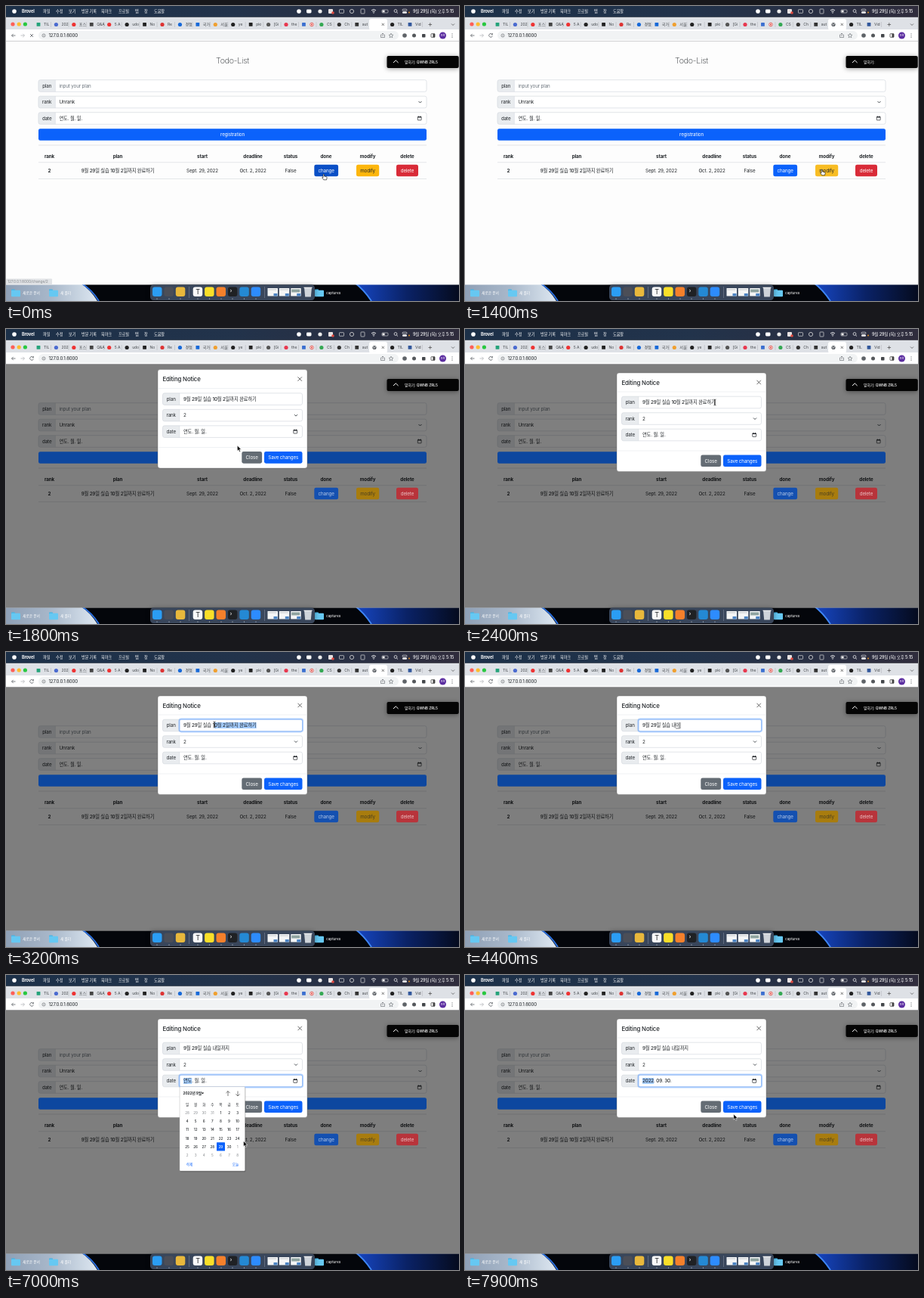
These frames come from a looping animation (600 px wide and 390 px high, 8 s). An HTML page:

```html
<!DOCTYPE html>
<html lang="ko">
<head>
<meta charset="utf-8">
<title>Todo-List</title>
<style>
html, body { margin: 0; width: 100%; height: 100%; overflow: hidden; background: #000; }
svg { display: block; width: 600px; height: 390px; }
text { font-family: Inter, 'Noto Sans CJK KR', 'Noto Sans CJK', sans-serif; letter-spacing: -.02em; white-space: pre; }
#dock, #call { filter: drop-shadow(0 1px 3px #0006); }
</style>
</head>
<body>
<svg id="stage" viewBox="0 0 600 390"></svg>
<script>
const INK = '#212529', BLUE = '#0b62fb', GREY = '#ced4da';
const PLAN = '9월 29일 실습 10월 2일까지 완료하기', KEPT = '9월 29일 실습 ';
const TYPED = ['', 'ㄴ', '내', '냉', '내이', '내일', '내일ㄲ', '내일까', '내일깢', '내일까지'];
const SPEAKER = '말하기: QWNB ZRL5';

// Shapes as markup; text is placed by its vertical middle
const rect = (x, y, w, h, fill, r = 0, more = '') =>
  `<rect x="${x}" y="${y}" width="${w}" height="${h}" fill="${fill}" rx="${r}" ${more}/>`;
const dot = (x, y, r, fill, more = '') => `<circle cx="${x}" cy="${y}" r="${r}" fill="${fill}" ${more}/>`;
const line = (d, color = INK, w = .8, more = '') =>
  `<path d="${d}" fill="none" stroke="${color}" stroke-width="${w}" ${more}/>`;
const text = (s, x, y, { size = 6.25, weight = /[가-힣]/.test(s) ? 500 : 400, fill = INK, mid = false, id = '' } = {}) =>
  `<text x="${x}" y="${y}" dy=".36em" fill="${fill}" font-size="${size}" font-weight="${weight}"` +
  `${mid ? ' text-anchor="middle"' : ''}${id ? ` id="${id}"` : ''}>${s}</text>`;
const button = (s, x, y, w, fill, ink = '#fff', id = s) =>
  rect(x, y, w, 15.6, fill, 2.4, `id="${id}"`) + text(s, x + w / 2, y + 7.8, { fill: ink, mid: true, id: id + 'Label' });
const group = (id, body) => `<g id="${id}">${body}</g>`;
const gradient = (id, ...colors) => `<linearGradient id="${id}">` +
  colors.map((c, i) => `<stop offset="${i / (colors.length - 1)}" stop-color="${c}"/>`).join('') + '</linearGradient>';

const calendarIcon = (x, y) => rect(x - 2.4, y - 2, 4.8, 4.4, 'none', .4, `stroke="${INK}" stroke-width=".7"`) +
  line(`M${x - 2.4} ${y - 1.5}h4.8M${x - 1.4} ${y - 3}v1M${x + 1.4} ${y - 3}v1`, INK, 1);
const chevron = (x, y) => line(`M${x - 2} ${y - 1}l2 2 2-2`, '#343a40', .9);

function field(x, y, w, label, value, kind, fill = INK, id = '') {
  const right = x + w, top = y - 7.8;
  return rect(x, top, w, 15.6, '#fff', 2.4) +
    `<path d="M${x + 22.3} ${top}H${x + 2.4}q-2.4 0-2.4 2.4v10.8q0 2.4 2.4 2.4H${x + 22.3}z" fill="#e9ecef"/>` +
    line(`M${x + 22.3} ${top}v15.6`, GREY, .5) +
    rect(x, top, w, 15.6, 'none', 2.4, `stroke="${GREY}" stroke-width=".6"`) +
    (id ? rect(0, y - 4, 0, 8, '#a3cbfb', 0, `id="${id}Mark"`) : '') +
    text(label, x + 11.2, y, { mid: true }) + text(value, x + 27.5, y, { fill, id, weight: id ? 500 : undefined }) +
    (kind === 'rank' ? chevron(right - 8.5, y) : kind === 'date' ? calendarIcon(right - 9.3, y) : '');
}

// Black sky between two curved, blue-rimmed bodies
const wallpaper = () => gradient('pale', '#8fa0b6', '#a9b8ca', '#dde7f1') + gradient('deep', '#1747c4', '#0a2266', '#050b1e') +
  rect(0, 366, 600, 24, '#04060b') +
  '<path d="M0 366H98Q112 375 121 390H0z" fill="url(#pale)"/>' + line('M99 366Q114 375 123 390', '#2a6fe0', 2) +
  '<path d="M462 366Q474 375 484 390H600V366z" fill="url(#deep)"/>' + line('M462 366Q474 375 484 390', '#3f86f5', 2);

function menuBar() {
  const white = { size: 5.2, fill: '#fff' };
  const items = [['파일', 49], ['수정', 66], ['보기', 83], ['방문 기록', 100], ['북마크', 126],
    ['프로필', 149], ['탭', 171], ['창', 183], ['도움말', 196]];
  return gradient('bar', '#1c3048', '#22334b', '#2f2c3c') + rect(0, 0, 600, 14.5, 'url(#bar)') + dot(11, 7, 2.8, '#fff') +
    text('Brovel', 21, 7, { size: 5.6, weight: 700, fill: '#fff' }) +
    items.map(([s, x]) => text(s, x, 7, white)).join('') +
    dot(388, 7, 2.8, '#fff') + rect(398, 4.5, 6.5, 5, '#fff', 1.4) +
    dot(416, 7, 2.6, '#eee') + rect(427, 4, 6, 6, '#e9e2e2', 1) + dot(433, 9, 1.8, '#e0483e') +
    rect(441.5, 4.7, 6, 4.6, 'none', .6, 'stroke="#ddd" stroke-width=".7"') +
    dot(458, 7, 2.6, 'none', 'stroke="#ddd" stroke-width=".8"') +
    rect(470, 4, 5, 6, 'none', .7, 'stroke="#ddd" stroke-width=".7"') +
    line('M484 5.8q3-2.6 6 0M485.4 7.5q1.6-1.5 3.2 0', '#fff', .9) + dot(487, 9, .7, '#fff') +
    rect(498, 5, 8, 4, 'none', 1, 'stroke="#ddd" stroke-width=".6"') + rect(498.6, 5.6, 3, 2.8, '#eee') +
    dot(516, 6.5, 1.9, 'none', 'stroke="#fff" stroke-width=".7"') + line('M517.4 8l1.6 1.6', '#fff') +
    rect(525, 4.2, 6, 2.2, 'none', 1.1, 'stroke="#fff" stroke-width=".6"') + rect(525, 7.6, 6, 2.2, '#fff', 1.1) +
    dot(534, 8.5, .9, '#f59a23') + text('9월 29일 (목) 오후 5:15', 539, 7, { ...white, size: 5.5 });
}

function browser() {
  const names = ['TIL', '202', '포스', 'Q&amp;A', '5 A', 'udo', 'No', 'Re', '경험', '국가', '서울', 'ye', 'pki',
    '[Gi', 'the', '', 'CS', 'Ch', 'aut', '', 'TIL', 'Vid'];
  const colors = ['#25a37a', '#4b6bd0', '#e33', '#444', '#e33', '#222', '#222', '#d33', '#1769d8', '#1769d8', '#f0a030',
    '#222', '#222', '#555', '#e8384f', '#3b6fd0', '#34a853', '#333', '#333', '', '#222', '#31579b'];
  let out = rect(0, 14.5, 600, 17, '#dee1e6') + rect(481, 17, 24, 14.5, '#fff', 2.5);
  ['#fe5f57', '#febc2e', '#28c840'].forEach((c, i) => out += dot(9 + i * 8.2, 24, 2.6, c));
  names.forEach((s, i) => {
    const x = 43 + i * 23.43;
    if (colors[i]) out += i % 3 ? dot(x, 24.5, 2.6, colors[i]) : rect(x - 2.4, 22, 4.8, 4.8, colors[i], .6);
    if (i < 18 || i > 20) out += line(`M${x + 16.5} 21v7`, '#a5a8ad', .4);
    out += text(s, x + 7, 24.5, { size: 5.1, fill: '#45494d' });
  });
  out += dot(405, 24.5, 2.3, '#fff', 'stroke="#e0403a" stroke-width=".8"') + dot(405, 24.5, 1.1, '#e0403a') +
    line('M497.7 22.8l3.2 3.2m0-3.2l-3.2 3.2M559.5 24.5h4.6m-2.3-2.3v4.6M590 23.5l2 2 2-2', '#444', .7) +
    group('globe', dot(488, 24.5, 2.6, '#5f6368') + line('M486 23.5l2 1 2-1.2M487 26l1-1', '#fff', .6));

  out += rect(0, 31, 600, 15.5, '#fff') + rect(43, 33, 477, 11.8, '#f1f3f4', 5.9) +
    line('M12.5 39h-5m2.2-2.2L7.5 39l2.2 2.2', '#5f6368') + line('M19.5 39h5m-2.2-2.2l2.2 2.2-2.2 2.2', '#b4b7ba') +
    group('reload', line('M36 37.3A2.4 2.4 0 1 0 36.4 39.6M36.4 36v1.9h-1.9', '#5f6368')) +
    group('stop', line('M32 37l4 4m0-4l-4 4', '#5f6368')) +
    dot(50, 39, 2.1, 'none', 'stroke="#5f6368" stroke-width=".6"') + line('M50 38.6v1.5M50 37.7v.4', '#5f6368', .6) +
    text('127.0.0.1:8000', 56.5, 39, { size: 6.1 }) +
    line('M497.5 38h-1v3.5h5v-3.5h-1M499 40v-4m-1.3 1.3L499 36l1.3 1.3', '#5f6368', .6) +
    line('M510 36.2l.9 1.9 2 .2-1.5 1.4.4 2-1.8-1-1.8 1 .4-2-1.5-1.4 2-.2z', '#5f6368', .6) +
    dot(528, 39, 2.8, '#5f6368') + dot(540.5, 39, 2.5, '#55585c') + rect(551, 37, 4.5, 4.5, '#44474b', .8) +
    rect(563, 36.7, 5, 4.6, 'none', .5, 'stroke="#444" stroke-width=".8"') + rect(565.5, 36.7, 2.5, 4.6, '#444') +
    dot(578.5, 39, 4.5, '#5b2da0') + text('초록', 578.5, 39, { size: 3.4, fill: '#fff', mid: true });
  [36.8, 39, 41.2].forEach(y => out += dot(591, y, .6, '#5f6368'));
  return out + line('M0 46.3h600', '#dfe1e4', .5);
}

function page() {
  const columns = [['rank', 57.5, '2'], ['plan', 148, PLAN], ['start', 260, 'Sept. 29, 2022'],
    ['deadline', 327, 'Oct. 2, 2022'], ['status', 377, 'False'], ['done', 424, ''], ['modify', 479, ''], ['delete', 531.5, '']];
  return rect(0, 46.5, 600, 322, '#fdfdfd') +
    text('Todo-List', 300, 72.5, { size: 10.6, weight: 200, mid: true }) +
    field(43, 105.5, 514, 'plan', 'input your plan', '', '#6c757d') +
    field(43, 127, 514, 'rank', 'Unrank', 'rank') +
    field(43, 148.5, 514, 'date', '연도. 월. 일.', 'date') +
    line('M43 184h514', '#c4c6c8', .5) + line('M43 206.7h514M43 228.5h514', '#d5d9dd', .6) +
    columns.map(([head, x, cell], i) => text(head, x, 198.5, { weight: 700, mid: true }) +
      text(cell, x, 217.5, { weight: i ? undefined : 700, mid: true })).join('');
}

const pageButtons = () => button('registration', 43, 162.2, 514, BLUE) +
  button('change', 408.3, 209.7, 31.8, BLUE) +
  button('modify', 464, 209.7, 30.2, '', INK) +
  button('delete', 517, 209.7, 29, '');

const focusRing = (id, y) => group(id,
  rect(229.2, y - 8.6, 164.1, 17.2, 'none', 3, 'stroke="#0d6efd" stroke-opacity=".3" stroke-width="1.6"') +
  rect(230, y - 7.8, 162.5, 15.6, 'none', 2, 'stroke="#86b7fe" stroke-width=".7"'));

const modal = () => rect(201, 58, 198, 130.4, '#fff', 3, 'stroke="#666" stroke-width=".4"') +
  text('Editing Notice', 207.5, 70.7, { size: 7.85, weight: 500 }) +
  line('M386.5 67.8l5.4 5.4m0-5.4l-5.4 5.4', '#555', .9) +
  line('M201 83h198M201 161h198', '#dee2e6', .5) +
  field(207.5, 97, 185, 'plan', PLAN, '', INK, 'planText') +
  field(207.5, 118.5, 185, 'rank', '2', 'rank') +
  field(207.5, 140, 185, 'date', '', 'date', INK, 'dateText') +
  focusRing('planFocus', 97) + focusRing('dateFocus', 140) +
  rect(0, 93, .6, 8, INK, 0, 'id="caret"') + rect(0, 100.7, 0, .6, INK, 0, 'id="compose"') +
  button('Close', 312.3, 166.5, 26.8, '#646c74') + button('Save changes', 342, 166.5, 50.5, BLUE, '#fff', 'save');

function picker() {
  const size = 4.6, mid = true;
  let out = rect(230.5, 148.5, 87, 112, '#000', 1.5, 'opacity=".18"') +
    rect(230, 147.6, 86.5, 111.4, '#fff', 1.2, 'stroke="#aaa" stroke-width=".4"') +
    text('2022년 9월', 234.5, 156.5, { size: 4.8, weight: 700 }) + '<path d="M259 155.6h3l-1.5 1.9z"/>' +
    line('M294 160v-6.5m-2.6 2.6l2.6-2.6 2.6 2.6M307 153.5v6.5m-2.6-2.6l2.6 2.6 2.6-2.6', '#444', .7) +
    rect(279, 221.3, 11, 11.3, BLUE, .6);
  [...'일월화수목금토'].forEach((s, i) => out += text(s, 240 + i * 11.1, 171, { size, mid }));
  for (let i = 0; i < 42; i++) {
    const day = i - 3, inside = day > 0 && day < 31;
    out += text(day < 1 ? day + 31 : inside ? day : day - 30, 240 + i % 7 * 11.1, 182.5 + (i / 7 | 0) * 11.15,
      { size, mid, weight: inside ? 500 : 400, fill: day === 29 ? '#fff' : inside ? INK : '#85898d' });
  }
  return out + text('삭제', 243, 250.5, { size, mid, fill: BLUE }) + text('오늘', 304, 250.5, { size, mid, fill: BLUE });
}

function folder(x, s) {
  return rect(x - 6, 374.5, 5, 3, '#45b4e6', .8) + rect(x - 6, 375.7, 12, 8.5, '#66c8f2', .9) +
    text(s, x + 9, 379.5, { size: 4.8, fill: '#fff' });
}

function dock() {
  const colors = ['#2b9df4', '#4b4e57', '#e8b83c', '#fafafa', '#f9df29', '#f5802b', '#1f2124', '#2489d4', '#2d8cff'];
  return rect(191, 368.5, 218, 20.5, '#3d4a60', 4.5, 'opacity=".95"') +
    colors.map((c, i) => rect((i < 3 ? 194 : 201.5) + i * 15.4, 371.5, 12.5, 12.5, c, 3)).join('') +
    line('M242.5 371v15M342.5 371v15', '#8a93a5', .5) +
    text('T', 254, 378, { size: 9, mid: true }) + line('M297 375l2 1.5-2 1.5', '#fff', .7) +
    [346.5, 361.8, 377.2].map((x, i) => rect(x, 373, 13.5, 10.5, '#f4f5f6', .6) +
      rect(x + 1, 374.5, 11, i === 2 ? 4 : 1, i === 2 ? '#8fa3a0' : '#c3c7cc') + rect(x + 8, 380, 5, 3.5, '#4c84c4', .6)).join('') +
    '<path d="M395 372h10l-1.2 12.5h-7.6z" fill="#cfd4da"/>' + line('M394.5 372.3h11', '#f8f8f8', 1) +
    [200, 216, 231, 254, 269.5, 285, 300, 315.5, 331].map(x => dot(x, 387, .6, '#ddd')).join('');
}

const cursors = () => group('arrow', '<path d="M0 0v7.2l1.7-1.5 1.2 2.7 1.3-.6-1.2-2.6h2.3z" fill="#000" stroke="#fff" stroke-width=".6"/>') +
  group('hand', '<path d="M0 .5q1-1 1.4.2v2.3l3 .7q.9.3.7 1.4l-.6 2.7H.8L-1.4 4.8q.2-1 1.4 0z" fill="#fff" stroke="#000" stroke-width=".6"/>') +
  group('beam', line('M-1.5-4q1.5 0 1.5 1v6q0 1-1.5 1M1.5-4q-1.5 0-1.5 1v6q0 1 1.5 1', '#222', .7));

const callBar = () => rect(504.5, 66, 95.2, 16, '#050505', 2) + line('M513 75l3.3-3.2 3.3 3.2', '#fff', 1) +
  text('', 528, 74, { size: 4.9, weight: 500, fill: '#fff', id: 'speaker' });

document.getElementById('stage').innerHTML = wallpaper() +
  folder(13, '새로운 문서') + folder(63, '새 폴더') + folder(415, 'captures') + browser() + page() +
  rect(0, 46.5, 600, 322, '#000', 0, 'id="shade"') + pageButtons() +
  group('status', rect(0, 360.5, 61, 8, '#e1e3e6', 1) + text('127.0.0.1:8000/change/2', 2, 364.7, { size: 4.9, fill: '#85898d' })) +
  group('dock', dock()) + group('modal', modal()) + group('picker', picker()) +
  group('call', callBar()) + menuBar() + group('cursor', cursors());

const el = {};
document.querySelectorAll('[id]').forEach(e => el[e.id] = e);
const show = (id, on) => el[id].style.display = on ? '' : 'none';
const set = (id, attrs) => Object.entries(attrs).forEach(([k, v]) => el[id].setAttribute(k, v));
const clamp = x => Math.max(0, Math.min(1, x));

const PATH = [[0, 420, 222], [700, 420, 222], [1300, 472, 216], [1500, 472, 216], [1800, 306.3, 154], [2300, 331, 97],
  [2700, 331, 97], [3200, 276, 96], [3400, 274, 96], [5700, 274, 96], [6200, 383, 140], [6500, 383, 140],
  [7000, 314.5, 219.5], [7300, 297, 226], [7500, 297, 226], [7900, 355.8, 184], [8000, 355.8, 184]];
function pointer(t) {
  const i = PATH.findIndex(p => p[0] > t), [t0, x0, y0] = PATH[i - 1], [t1, x1, y1] = PATH[i];
  const p = (t - t0) / (t1 - t0), k = p * p * (3 - 2 * p);
  return [x0 + (x1 - x0) * k, y0 + (y1 - y0) * k];
}

function draw(t) {
  const [x, y] = pointer(t), over = (a, b) => t < 1550 && x > a && x < b;
  const loading = t < 600, shade = clamp((t - 1470) / 150), enter = clamp((t - 1620) / 300);
  show('stop', loading); show('reload', !loading); show('globe', !loading); show('status', loading);
  el.speaker.textContent = t >= 1000 && t < 1600 ? '말하기:' : SPEAKER;
  set('shade', { opacity: shade * .5 });
  const paint = (id, lit, dim) => {
    el[id].style.fill = `color-mix(in srgb, ${dim} ${shade * 100}%, ${lit})`;
    set(id + 'Label', { opacity: 1 - .3 * shade });
  };
  paint('registration', BLUE, '#0d479f');
  paint('change', over(408, 440) ? '#0a4fc6' : BLUE, '#1450b0');
  paint('modify', over(464, 494) ? '#f8bd24' : '#fdb60d', '#a87c0e');
  paint('delete', '#d92b38', '#b8343b');
  show('modal', enter > 0);
  set('modal', { transform: `translate(0 ${-20.8 * (1 - enter) ** 1.7})`, opacity: clamp(enter * 2) });

  // Plan input: drag selection, then Hangul composition
  const typing = t >= 3700, step = Math.min(TYPED.length - 1, Math.floor((t - 3700) / 190) + 1);
  const planFocus = t >= 2500 && t < 6300;
  el.planText.textContent = typing ? KEPT + TYPED[step] : PLAN;
  show('planFocus', planFocus);
  show('planTextMark', planFocus && t > 2700 && !typing);
  show('caret', planFocus && (typing || t <= 2700));
  show('compose', planFocus && typing);
  if (planFocus) {
    const end = 235 + el.planText.getComputedTextLength();
    set('caret', { x: end });
    if (typing) set('compose', { x: end - 5.6, width: 5.6 });
    else {
      let from = end;
      for (let i = PLAN.length; i--;) {
        const start = el.planText.getStartPositionOfChar(i).x;
        if (start >= x - 1) from = start;
      }
      set('planTextMark', { x: from, width: end - from });
    }
  }

  // Date input: the year part is marked while focused
  const chosen = t >= 7500, dateFocus = t >= 6300;
  el.dateText.textContent = chosen ? '2022. 09. 30.' : '연도. 월. 일.';
  show('dateFocus', dateFocus); show('dateTextMark', dateFocus);
  if (dateFocus) set('dateTextMark', { x: 235, width: el.dateText.getSubStringLength(0, chosen ? 4 : 2) });
  show('picker', t >= 6500 && !chosen);

  const kind = t < 1550 ? 'hand' : t >= 2200 && t < 6000 ? 'beam' : 'arrow';
  ['hand', 'beam', 'arrow'].forEach(k => show(k, k === kind));
  show('cursor', !typing || t >= 5700);
  set('cursor', { transform: `translate(${x} ${y})` });
}

const begin = performance.now();
function tick() {
  draw(Math.floor((performance.now() - begin) % 8000 / 100) * 100);
  requestAnimationFrame(tick);
}
tick();
</script>
</body>
</html>
```
